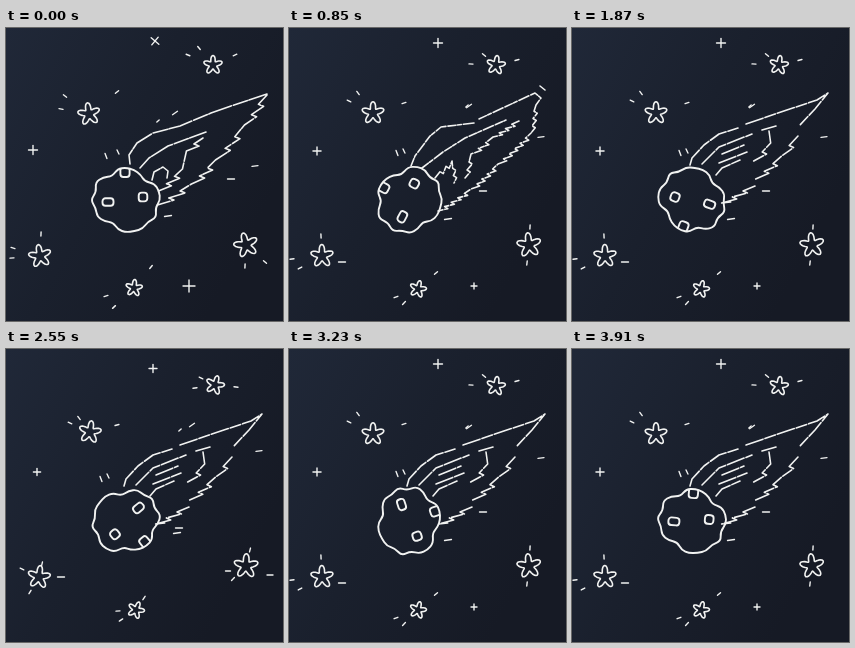
Write an HTML page with a canvas that moves like this. It is 277 px wide and 293 px high and loops after 4110 ms.

```html
<!DOCTYPE html>
<html lang="en">
<head>
<meta charset="utf-8">
<title>Meteor</title>
<style>
  html, body { margin: 0; width: 100%; height: 100%; overflow: hidden; background: #191f2b; }
  canvas { display: block; }
</style>
</head>
<body>
<canvas id="stage" width="277" height="293"></canvas>
<script>
const ctx = document.getElementById('stage').getContext('2d');
const W = 277, H = 293, LOOP = 4110, STEP = 170, STEPS = 24;
const INK = '#f1f2f1', RAD = Math.PI / 180;
const lerp = (a, b, k) => a + (b - a) * k;

// The sky swings between three poses; positions are x, y for each.
const SWING = [0, 1, 1.5, 2, 1.5, 1];
const place = (v, p) => {
  const i = p < 1 ? 0 : 2, k = p < 1 ? p : p - 1;
  return [lerp(v[i], v[i + 2], k), lerp(v[i + 1], v[i + 3], k)];
};

// x, y, radius, turn, then the sparks around it
const stars = [
  { at: [83, 86, 84, 85, 84, 83], r: 11.3, turn: -8, sparks: [
    [55, 81, 60, 73, 64, 74], [59, 68, 69, 65, 73, 69], [111, 64, 115, 75, 111, 76]] },
  { at: [207, 37, 207, 37, 209, 36], r: 9.5, turn: 0, sparks: [
    [193, 20, 195, 27, 195, 29], [182, 27, 182, 36, 189, 39], [229, 27, 228, 32, 230, 38]] },
  { at: [34, 228, 33, 228, 33, 228], r: 11.5, turn: -9, sparks: [
    [35, 206, 32, 208, 36, 215], [7, 220, 3, 231, 16, 220], [6, 230, 11, 240, 24, 243]] },
  { at: [128, 260, 129, 261, 130, 261], r: 8.5, turn: 6, sparks: [
    [145, 239, 147, 245, 138, 249], [100, 268, 107, 269, 112, 262], [108, 279, 115, 275, 115, 271]] },
  { at: [240, 217, 240, 217, 240, 217], r: 12.3, turn: -14, sparks: [
    [239, 238, 238, 235, 227, 230], [259, 234, 241, 199, 244, 201]] }
];
// Sparks of a single pose: pose, x, y, length
const lone = [[1, 53, 234, 7], [2, 55, 228, 7], [2, 264, 226, 6], [2, 222, 222, 5]];
const crosses = [
  { at: [149, 13, 149, 15, 147, 19.5], r: [5, 4], turn: 40 },
  { at: [27, 122, 28, 123, 31, 123], r: [4.5, 3.6], turn: 0 },
  { at: [183, 258, 185, 258, 186, 258], r: [6, 0], turn: 0 }
];
// Sparks around the meteor: length, angle, positions
const trailSparks = [
  [5.5, 70, 100, 128, 108, 125, 95, 130], [4.5, 65, 112, 124, 115, 123, 102, 127],
  [6, -35, 169, 85, 180, 78, 186, 76], [3, -40, 152, 93, 178, 78, 174, 81],
  [6, -8, 249, 138, 252, 109, 253, 102], [7, 0, 225, 151, 194, 163, 173, 179],
  [7, -8, 162, 188, 159, 191, 171, 184]
];

// Tails as sparse strokes; `barbs` sets how far apart the edge notches are.
const wide = { barbs: 13, dash: [15, 1.5, 24, 2], strokes: [
  [124, 136, 123, 127, 131, 115, 147, 105, 174, 98, 205, 85, 225, 78, 261, 66],
  [134, 140, 143, 130, 162, 118, 200, 104],
  [146, 152, 148, 144, 157, 139, 162, 143, 161, 150]
], edges: [
  [261, 67, 240, 98, 211, 133, 187, 157, 153, 178],
  [197, 110, 182, 124, 178, 142, 154, 164]
] };
const jagged = { barbs: 8, dash: [8, 1.5, 4, 2, 11, 2], strokes: [
  [122, 138, 126, 128, 141, 108, 152, 99, 185, 95],
  [190, 91, 218, 78, 246, 65, 252, 70, 247, 77], [251, 58, 256, 62],
  [133, 140, 154, 124, 176, 110, 217, 92]
], edges: [
  [247, 77, 243, 106, 210, 137, 183, 162, 150, 184],
  [230, 93, 205, 110, 183, 127, 177, 151],
  [146, 150, 164, 134, 166, 156]
] };
const slim = { barbs: 11, dash: [18, 2, 11, 2], strokes: [
  [118, 137, 120, 130, 132, 117, 147, 106, 166, 100],
  [174, 96, 203, 86, 245, 72, 256, 65, 243, 81, 227, 98],
  [130, 136, 147, 119, 180, 106], [190, 102, 204, 98],
  [150, 126, 172, 117], [147, 135, 175, 124], [144, 147, 150, 140, 168, 132]
], edges: [
  [226, 108, 211, 129, 185, 152], [183, 158, 151, 176, 160, 175],
  [197, 103, 200, 116, 183, 134]
] };
const tails = [wide, jagged, wide, slim];

// Rock outline as radii at even angles
const radii = [34, 30, 35, 30.5, 33, 32, 32, 30.5, 25.5, 30, 33, 31,
  35, 30.5, 35, 32, 27, 32, 32, 31, 29, 26, 32.5, 34];
// x, y, half width, half height
const craters = [[-18, 2, 5.5, 3.8], [17, -3, 4.3, 4.4], [-1, -28, 4.6, 5]];
// Step and turn of the rock
const turns = [[0, 0], [5, 62], [9, 114], [11, 160], [15, 220], [19, 288], [23, 355]];
function turnAt(step) {
  const i = Math.max(1, turns.findIndex(k => k[0] >= step));
  const [s0, a0] = turns[i - 1], [s1, a1] = turns[i];
  return lerp(a0, a1, (step - s0) / (s1 - s0));
}

const polar = list => list.map((r, i) => {
  const a = i * 2 * Math.PI / list.length;
  return [r * Math.cos(a), r * Math.sin(a)];
});
// Closed soft curve through the midpoints
function blob(pts) {
  const path = new Path2D(), n = pts.length;
  const mid = i => [0, 1].map(c => (pts[i % n][c] + pts[(i + 1) % n][c]) / 2);
  path.moveTo(...mid(0));
  for (let i = 1; i <= n; i++) path.quadraticCurveTo(...pts[i % n], ...mid(i));
  path.closePath();
  return path;
}
const rock = blob(polar(radii.map(r => r + 0.3)));

function strokePath(path, v) {
  path.moveTo(v[0], v[1]);
  for (let i = 2; i < v.length; i += 2) path.lineTo(v[i], v[i + 1]);
}
// Ragged edge: every notch doubles back a little
function edgePath(path, v, gap) {
  path.moveTo(v[0], v[1]);
  for (let i = 2; i < v.length; i += 2) {
    const [x0, y0, x1, y1] = v.slice(i - 2, i + 2);
    const n = Math.max(1, Math.round(Math.hypot(x1 - x0, y1 - y0) / gap));
    for (let j = 1; j <= n; j++) {
      const x = lerp(x0, x1, j / n), y = lerp(y0, y1, j / n);
      path.lineTo(x - gap * 0.12, y - 1);
      if (j < n) path.lineTo(x + gap * 0.28, y + 1);
    }
  }
}
for (const tail of [wide, jagged, slim]) {
  tail.path = new Path2D();
  tail.strokes.forEach(v => strokePath(tail.path, v));
  tail.edges.forEach(v => edgePath(tail.path, v, tail.barbs));
}

function sky() {
  const base = ctx.createLinearGradient(0, 0, W, H * 0.5);
  base.addColorStop(0, '#202838');
  base.addColorStop(0.5, '#1a202d');
  base.addColorStop(1, '#161a25');
  ctx.fillStyle = base;
  ctx.fillRect(0, 0, W, H);
}
function dash(x, y, len, a) {
  const c = Math.cos(a) * len / 2, s = Math.sin(a) * len / 2;
  ctx.beginPath();
  ctx.moveTo(x - c, y - s);
  ctx.lineTo(x + c, y + s);
  ctx.stroke();
}
function star({ at, r, turn, sparks }, p) {
  const [x, y] = place(at, p);
  ctx.lineWidth = 1.6;
  ctx.beginPath();
  for (let i = 0; i < 60; i++) {
    const a = i * 6 * RAD, d = r * (0.71 + 0.29 * Math.cos(5 * a));
    const b = a + (turn + 8 * p - 90) * RAD;
    ctx.lineTo(x + d * Math.cos(b), y + d * Math.sin(b));
  }
  ctx.closePath();
  ctx.stroke();
  ctx.lineWidth = 1.4;
  for (const spark of sparks) {
    const [sx, sy] = place(spark, p);
    dash(sx, sy, 4, Math.atan2(sy - y, sx - x));
  }
}
function cross({ at, r, turn }, p) {
  const [x, y] = place(at, p), size = lerp(r[0], r[1], p / 2);
  if (size < 0.1) return;
  const a = turn * Math.max(0, 1 - p) * RAD;
  dash(x, y, size * 2, a);
  dash(x, y, size * 2, a + Math.PI / 2);
}
function meteor(step) {
  const tail = tails[step % tails.length];
  ctx.lineWidth = 1.6;
  ctx.setLineDash(tail.dash);
  ctx.stroke(tail.path);
  ctx.setLineDash([]);
  ctx.save();
  ctx.translate(120, 172);
  ctx.rotate(-turnAt(step) * RAD);
  ctx.lineWidth = 1.9;
  ctx.stroke(rock);
  ctx.clip(rock);
  for (const [x, y, w, h] of craters) {
    ctx.beginPath();
    ctx.roundRect(x - w, y - h, w * 2, h * 2, 3);
    ctx.stroke();
  }
  ctx.restore();
}
function draw(step) {
  const p = SWING[step % SWING.length];
  sky();
  ctx.strokeStyle = INK;
  ctx.lineCap = ctx.lineJoin = 'round';
  stars.forEach(s => star(s, p));
  crosses.forEach(c => cross(c, p));
  for (const [len, a, ...at] of trailSparks) dash(...place(at, p), len, a * RAD);
  for (const [on, x, y, len] of lone) if (on === p) dash(x, y, len, 0);
  meteor(step);
}

function tick() {
  const t = performance.now() % LOOP;
  draw(Math.min(STEPS - 1, Math.floor(t / STEP)));
  requestAnimationFrame(tick);
}
tick();
</script>
</body>
</html>
```
